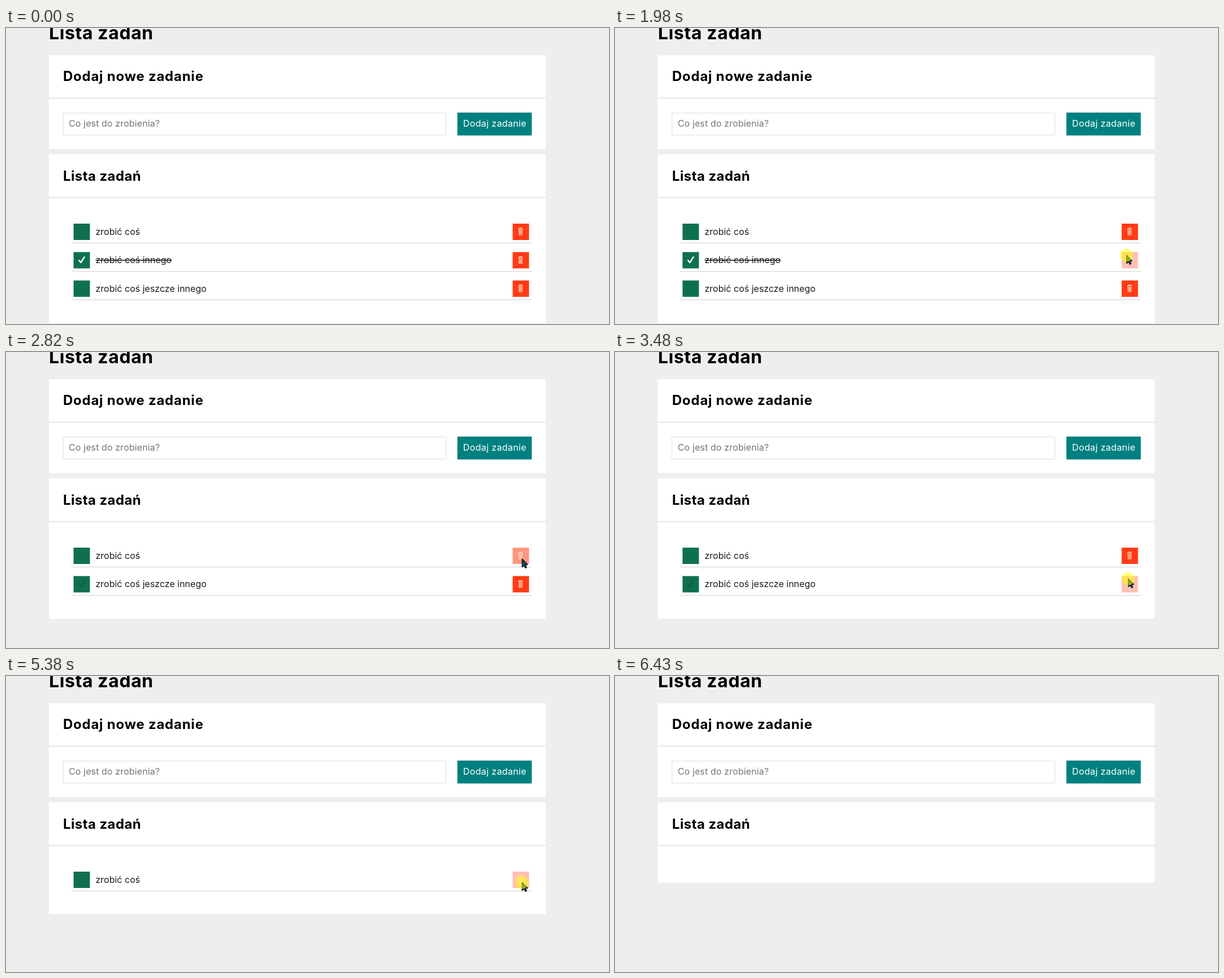
Write an HTML page that moves like this. It is 1067 by 525 pixels and loops after 6860 ms.

```html
<!DOCTYPE html>
<html lang="pl">
<head>
<meta charset="utf-8">
<title>Lista zadań</title>
<style>
  html, body { margin: 0; width: 100%; height: 100%; overflow: hidden; background: #eee; }
  svg { display: block; font: 16px Inter, "Open Sans", sans-serif; }
  .card { fill: #fff; }
  .line { fill: #ddd; }
  .title { font-weight: 700; font-size: 24px; }
  .main { font-size: 32px; letter-spacing: .6px; }
  .hint { fill: #757575; letter-spacing: .12px; }
  .add { fill: #fff; letter-spacing: .36px; }
  .task { fill: #1c1c1c; }
  .done .task { text-decoration: line-through; }
  .box { fill: #0f7051; }
  .tick { fill: none; stroke: #fff; stroke-width: 2.5; stroke-linejoin: round; stroke-linecap: round; }
  .ghost { stroke: #0b5f55; }
  .bin { fill: none; stroke: #ffe3c8; stroke-width: 1.1; }
  .halo { fill: #ff0; opacity: .52; }
</style>
</head>
<body>
<svg width="1067" height="525" viewBox="0 0 1067 525">
  <rect width="1067" height="525" fill="#eee"/>
  <text class="title main" x="76" y="20.3">Lista zadań</text>

  <rect class="card" x="76" y="48.5" width="879" height="166.2"/>
  <text class="title" x="101" y="94.3" letter-spacing=".75">Dodaj nowe zadanie</text>
  <rect class="line" x="76" y="123.7" width="879" height="1.5"/>
  <rect x="100.8" y="150.8" width="677.6" height="39" fill="#fff" stroke="#e9e9e9" stroke-width="1.6"/>
  <text class="hint" x="111" y="175.3">Co jest do zrobienia?</text>
  <rect x="798.7" y="150" width="131.7" height="40.6" fill="#008080"/>
  <text class="add" x="808.8" y="175.3">Dodaj zadanie</text>

  <rect class="card" id="list" x="76" y="224" width="879" height="299"/>
  <text class="title" x="101" y="270.5" letter-spacing=".4">Lista zadań</text>
  <rect class="line" x="76" y="300" width="879" height="1.5"/>
  <g id="rows"></g>

  <g id="pointer">
    <path id="arrow" d="M.3 0V14.6L3.7 11.8L6 16.2L8.2 15.1L6.2 10.8L10 10.2Z" stroke="#000" stroke-width="1.2" stroke-linejoin="round"/>
    <circle class="halo" id="halo" r="11.5"/>
  </g>
</svg>
<script>
  const LOOP = 6860, PITCH = 50.4, TOP = 347;
  const $ = id => document.getElementById(id);

  // removed: when the task leaves the list
  const tasks = [
    { text: 'zrobić coś', removed: 5460 },
    { text: 'zrobić coś innego', removed: 2070, done: true },
    { text: 'zrobić coś jeszcze innego', removed: 3560 }
  ];
  const clicks = [[1980, 2070], [3480, 3560], [5380, 5460]];

  // first step, last step, step count, then start, control and end points
  const moves = [
    [910, 1410, 7, 951, 508, 926, 481, 913, 462],
    [1490, 1730, 4, 912, 444, 909, 415, 905, 403],
    [2320, 2820, 7, 908, 401, 924, 384, 913, 367],
    [3140, 3390, 4, 913, 375, 911, 390, 908, 402],
    [3640, 4120, 7, 909, 398, 911, 375, 913, 366],
    [5540, 6030, 7, 920, 371, 955, 385, 1009, 449],
    [6110, 6350, 4, 1016, 462, 1027, 488, 1036, 520]
  ];
  const HIDDEN = 6430;

  const tick = cls => `<path class="tick ${cls}" d="M129.3 14.9L132.4 18.6L138.6 9"/>`;

  $('rows').innerHTML = tasks.map(task => `
    <g class="${task.done ? 'done' : ''}">
      <rect class="box" x="119.5" width="29" height="29"/>
      ${tick(task.done ? '' : 'ghost')}
      <text class="task" x="158.5" y="19.8">${task.text}</text>
      <rect class="del" x="896.5" width="29" height="29"/>
      <path class="bin" d="M906.5 9.2H914.5M909 9V7.8H912V9M907.5 9.5L908 20H913L913.5 9.5M909.6 11V18.5M911.4 11V18.5"/>
      <rect class="line" x="115" y="33.6" width="815" height="1.5"/>
    </g>`).join('');
  tasks.forEach((task, i) => {
    task.el = $('rows').children[i];
    task.del = task.el.querySelector('.del');
    task.ghost = task.el.querySelector('.ghost');
  });

  const curve = (a, b, c, u) => a * (1 - u) ** 2 + 2 * b * u * (1 - u) + c * u * u;

  function pointerAt(t) {
    const move = moves.filter(m => m[0] <= t).pop();
    if (!move || t >= HIDDEN) return null;
    const [from, to, count, x0, y0, x1, y1, x2, y2] = move;
    const last = count - 1;
    const step = Math.min(last, Math.floor((t - from) / (to - from) * last + .01));
    const u = step / last;
    return { x: curve(x0, x1, x2, u), y: curve(y0, y1, y2, u) };
  }

  const show = (el, on) => el.setAttribute('visibility', on ? 'visible' : 'hidden');

  function draw(now) {
    const t = now % LOOP;
    const tip = pointerAt(t);
    const pressed = clicks.some(([a, b]) => t >= a && t < b);
    let slot = 0, hovered = false;

    for (const task of tasks) {
      const alive = t < task.removed;
      task.el.style.display = alive ? '' : 'none';
      if (!alive) continue;
      const y = TOP + slot * PITCH;
      const over = tip && tip.x >= 896 && tip.x < 926 && tip.y >= y && tip.y < y + 29;
      hovered = hovered || over;
      task.el.setAttribute('transform', `translate(0 ${y})`);
      task.del.setAttribute('fill', !over ? '#ff3c17' : pressed ? '#ffc0b4' : '#ff9681');
      if (task.ghost) task.ghost.style.display = slot === 1 ? '' : 'none';
      slot++;
    }
    $('list').setAttribute('height', slot ? 148.2 + slot * PITCH : 142.3);

    show($('pointer'), tip);
    $('halo').style.display = pressed ? '' : 'none';
    if (tip) {
      $('pointer').setAttribute('transform', `translate(${tip.x} ${tip.y})`);
      $('arrow').setAttribute('fill', hovered ? '#0a4f56' : '#222');
    }
    requestAnimationFrame(draw);
  }
  draw(performance.now());
</script>
</body>
</html>
```
